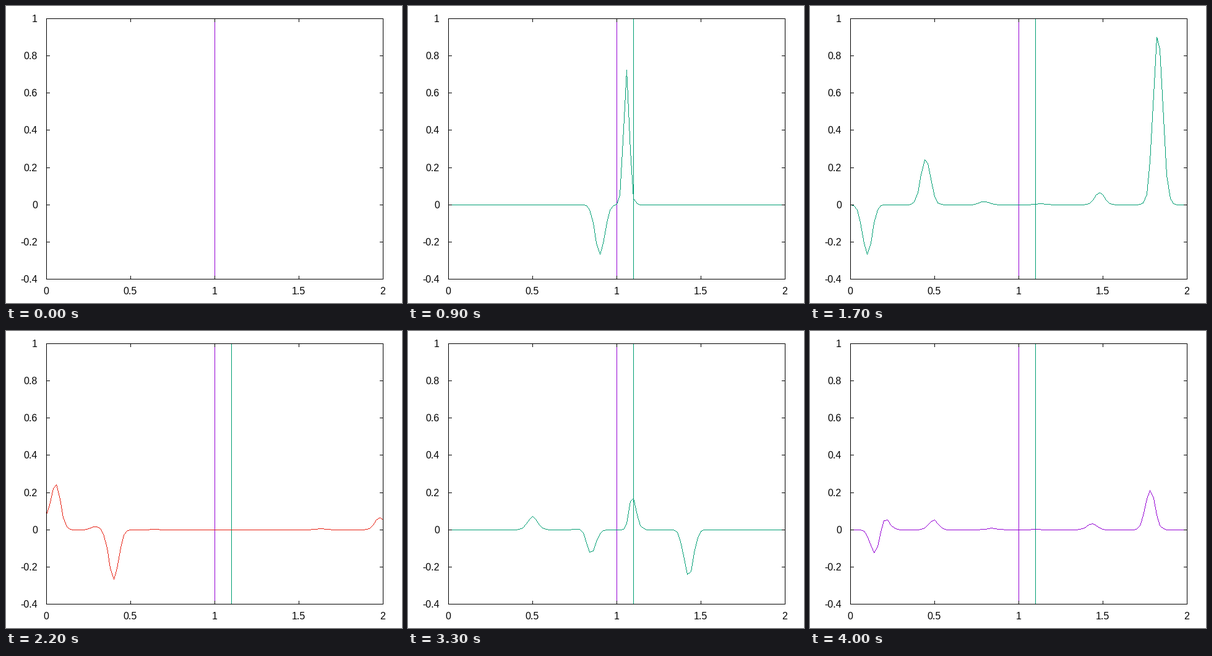
Write a matplotlib script that moves like this. It is 640x480 px and loops after 4100 ms.

```python
import matplotlib.pyplot as plt
import numpy as np
from matplotlib.animation import FuncAnimation
from matplotlib.colors import to_rgb
from matplotlib.transforms import IdentityTransform

W, H, DPI = 640, 480, 100
LEFT, RIGHT, TOP, BOTTOM = 65, 609, 20, 441
TICK = 5
FRAMES, INTERVAL = 41, 100

COLORS = ["#9400d3", "#009e73", "#56b4e9", "#e69f00",
          "#f0e442", "#0072b2", "#e51e10", "#000000"]

# Slab between x = 1 and x = 1.1, free end at x = 0, open end at x = 2
INDEX = np.sqrt(3)
START, THICK = 1.0, 0.1
TRANSIT = INDEX * THICK
R = (1 - INDEX) / (1 + INDEX)
WIDTH = 0.04
BOUNCES = range(4)


def pulse(s):
    return np.exp(-(s / WIDTH) ** 2)


def echoes(hit):
    """Pulses that the slab sends back to the left after one hit."""
    t, a = hit
    yield t, a * R
    for k in BOUNCES[1:]:
        yield t + 2 * k * TRANSIT, -a * (1 - R * R) * R ** (2 * k - 1)


def all_hits(generations=3):
    """Arrival time and amplitude of every pulse reaching the slab."""
    hits, wave = [], [(START, 1.0)]
    for _ in range(generations):
        hits += wave
        wave = [(t + 2 * START, a) for hit in wave for t, a in echoes(hit)]
    return hits


HITS = all_hits()
x = np.linspace(0, 2, 101)
before = x <= START
after = x >= START + THICK
inside = ~(before | after)


def field(t):
    e = np.zeros_like(x)
    xl = x[before] - START
    xs = INDEX * (x[inside] - START)
    xr = x[after] - START - THICK
    for hit in HITS:
        s, a = t - hit[0], hit[1]
        e[before] += a * pulse(s - xl)
        for te, ae in echoes(hit):
            e[before] += ae * pulse(t - te + xl)
        for k in BOUNCES:
            b = a * (1 + R) * R ** (2 * k)
            sk = s - 2 * k * TRANSIT
            e[inside] += b * pulse(sk - xs)
            e[inside] -= b * R * pulse(sk - 2 * TRANSIT + xs)
            e[after] += b * (1 - R) * pulse(sk - TRANSIT - xr)
    return e


def nearest(v):
    return np.floor(v + 0.5).astype(int)


def to_x(v):
    return nearest(LEFT + v * (RIGHT - LEFT) / 2)


def to_y(v):
    return nearest(BOTTOM - (v + 0.4) * (BOTTOM - TOP) / 1.4)


def stroke(img, x0, y0, x1, y1, color="#000000"):
    """One-pixel hard-edged line, kept within the plot box."""
    n = max(abs(x1 - x0), abs(y1 - y0)) + 1
    px = nearest(np.linspace(x0, x1, n))
    py = nearest(np.linspace(y0, y1, n))
    ok = (px >= LEFT) & (px <= RIGHT) & (py >= TOP) & (py <= BOTTOM)
    img[py[ok], px[ok]] = [round(255 * c) for c in to_rgb(color)]


def draw_frame(img):
    for px in (LEFT, RIGHT):
        stroke(img, px, TOP, px, BOTTOM)
    for py in (TOP, BOTTOM):
        stroke(img, LEFT, py, RIGHT, py)
    for px in to_x(X_TICKS):
        stroke(img, px, BOTTOM, px, BOTTOM - TICK)
        stroke(img, px, TOP, px, TOP + TICK)
    for py in to_y(Y_TICKS):
        stroke(img, LEFT, py, LEFT + TICK, py)
        stroke(img, RIGHT, py, RIGHT - TICK, py)


def draw_wall(img, v, color):
    stroke(img, to_x(v), TOP, to_x(v), BOTTOM, color)


def draw_curve(img, e, color):
    px, py = to_x(x), to_y(e)
    for i in range(len(x) - 1):
        stroke(img, px[i], py[i], px[i + 1], py[i + 1], color)


def label(px, py, value, ha):
    fig.text(px, H - py, f"{value:g}", ha=ha, va="baseline",
             transform=IdentityTransform(), family="Liberation Sans",
             fontsize=16 * 72 / DPI, color="black")


X_TICKS = np.arange(5) / 2
Y_TICKS = np.arange(-2, 6) / 5

plt.rcParams["text.hinting"] = "default"
fig = plt.figure(figsize=(W / DPI, H / DPI), dpi=DPI, facecolor="white")
canvas = np.full((H, W, 3), 255, np.uint8)
stage = fig.figimage(canvas, origin="upper")

for v in X_TICKS:
    label(to_x(v), 466, v, "center")
for v in Y_TICKS:
    label(51, to_y(v) + 6, v, "right")


def update(n):
    img = canvas.copy()
    draw_wall(img, START, COLORS[0])
    if n > 0:
        draw_wall(img, START + THICK, COLORS[1])
        draw_curve(img, field(0.2 + 0.1 * n), COLORS[n % len(COLORS)])
    draw_frame(img)
    stage.set_data(img)
    return [stage]


anim = FuncAnimation(fig, update, frames=FRAMES, interval=INTERVAL,
                     repeat=True, blit=False)
plt.show()
```
